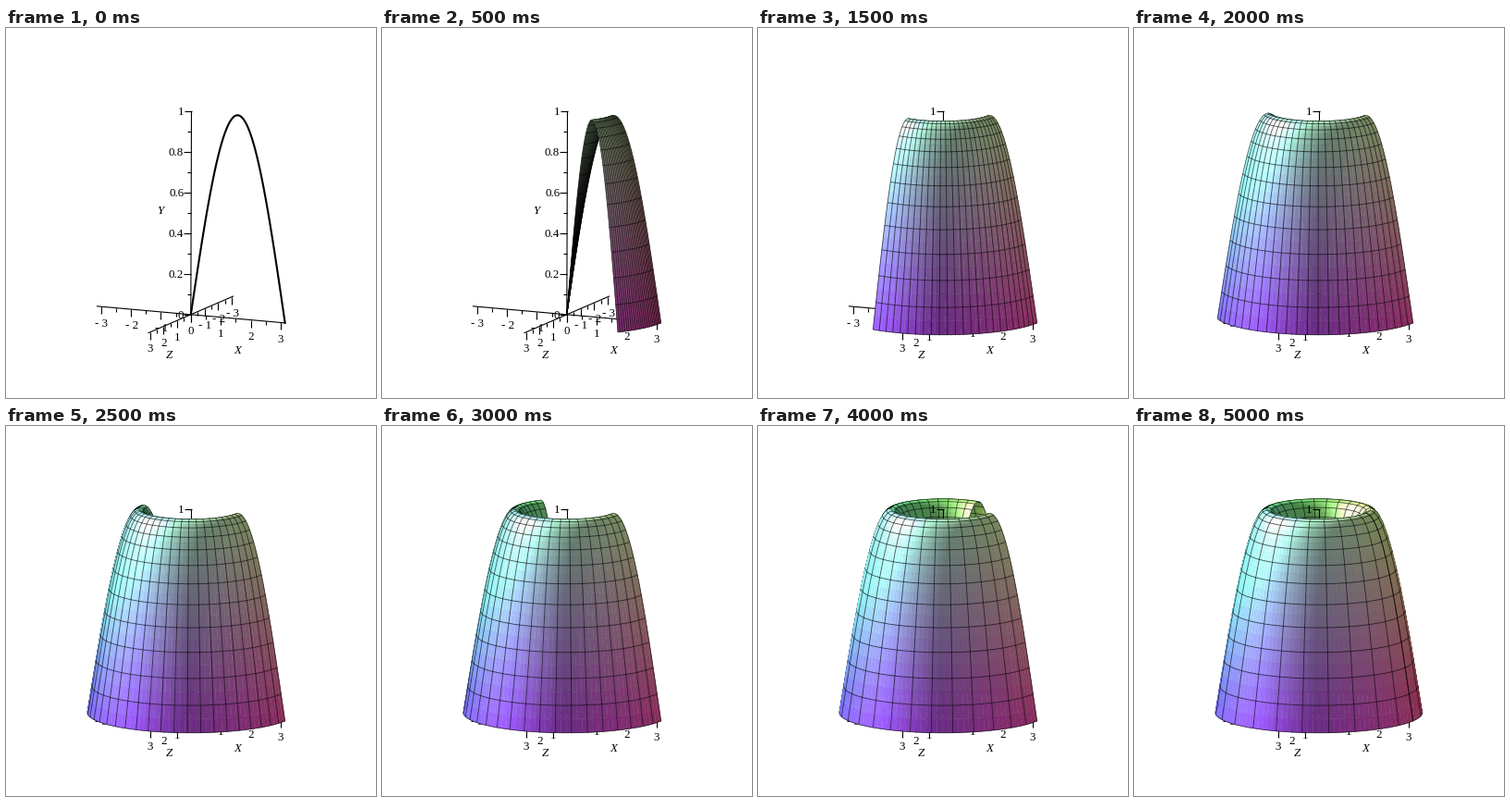
Write a matplotlib script that moves like this. It is 400 px wide and 400 px high and loops after 5.5 s.

```python
import numpy as np
import matplotlib.pyplot as plt
from matplotlib.animation import FuncAnimation
from matplotlib.collections import LineCollection, PolyCollection

SIZE, DPI = 400, 100
FRAMES, INTERVAL = 11, 500
GRID = 24                                   # mesh cells in each direction
PX = 72 / DPI                               # points per pixel
CENTER = np.array([199.8, 309.8])
SCALE, RISE = 35.6, 220.0                   # pixels per ground unit and per unit of Y
AZ, EL = np.radians(65.6), np.radians(11.3)
STRETCH = RISE / np.cos(EL) / SCALE

plt.rcParams["font.family"] = "Liberation Serif"
fig = plt.figure(figsize=(SIZE / DPI, SIZE / DPI), dpi=DPI, facecolor="white")
ax = fig.add_axes([0, 0, 1, 1])


def project(x, y, z):
    across = x * np.sin(AZ) - z * np.cos(AZ)
    near = x * np.cos(AZ) + z * np.sin(AZ)
    return np.stack([CENTER[0] + SCALE * across,
                     CENTER[1] + SCALE * np.sin(EL) * near - RISE * y], -1)


def surface(r, t):
    return project(r * np.cos(t), np.sin(r) + 0 * t, r * np.sin(t))


def direction(az, el):
    return np.array([np.cos(az) * np.cos(el), np.sin(az) * np.cos(el), np.sin(el)])


VIEW = direction(AZ, EL)
LIGHT = direction(np.radians(165), np.radians(35))
HALF = (VIEW + LIGHT) / np.linalg.norm(VIEW + LIGHT)


def shade(r, t):
    """Position-based colour with ambient, diffuse and specular light."""
    x, y, z = r * np.cos(t), np.sin(r) + 0 * t, r * np.sin(t)
    base = 0.3 + 0.7 * np.stack([(x / np.pi + 1) / 2, y, (z / np.pi + 1) / 2], -1)
    slope = -STRETCH * np.cos(r)
    n = np.stack([slope * np.cos(t), slope * np.sin(t), np.ones_like(x)], -1)
    n /= np.linalg.norm(n, axis=-1, keepdims=True)
    n *= np.where(n @ VIEW < 0, -1, 1)[..., None]
    diffuse = np.clip(n @ LIGHT, 0, None)[..., None]
    gloss = np.clip(n @ HALF, 0, None)[..., None] ** 20
    return np.clip(base * (0.53 + diffuse) + 0.35 * gloss * (diffuse > 0), 0, 1)


def draw_sheet(r0, r1, lo, hi, meridians, z):
    r = np.linspace(r0, r1, GRID + 1)
    t = np.linspace(lo, hi, max(2, int(np.degrees(hi - lo) / 3) + 2))
    p = surface(r[:, None], t[None, :])
    quads = np.stack([p[:-1, :-1], p[1:, :-1], p[1:, 1:], p[:-1, 1:]], 2)
    rm, tm = (r[1:] + r[:-1]) / 2, (t[1:] + t[:-1]) / 2
    colors = shade(rm[:, None], tm[None, :]).reshape(-1, 3)
    ax.add_collection(PolyCollection(quads.reshape(-1, 4, 2), facecolors=colors,
                                     edgecolors=colors, linewidths=0.4 * PX, zorder=z))
    lines = [surface(a, t) for a in np.linspace(r0, r1, GRID // 2 + 1)]
    lines += [surface(r, np.full_like(r, m)) for m in meridians]
    ax.add_collection(LineCollection(lines, colors=[(0, 0, 0, 0.62)],
                                     linewidths=0.9 * PX, zorder=z + 0.1))


def draw_surface(angle):
    steps = np.linspace(0, angle, GRID + 1)
    left, right = AZ + np.pi / 2, AZ + 3 * np.pi / 2
    for lo, hi, front in [(left, right, False), (0, left, True), (right, 2 * np.pi, True)]:
        hi = min(hi, angle)
        if hi - lo < 1e-6:
            continue
        inside = steps[(steps >= lo - 1e-9) & (steps <= hi + 1e-9)]
        inner, outer = (6, 7) if front else (2, 1)
        draw_sheet(0, np.pi / 2, lo, hi, inside, inner)
        draw_sheet(np.pi / 2, np.pi, lo, hi, inside, outer)


def label(x, y, s, ha="center", style="normal"):
    ax.text(x, y + 4.4, s, ha=ha, va="baseline", fontsize=13 * PX,
            style=style, color="black", zorder=4)


def draw_axes():
    lines = []

    def tick(p, dx, dy):
        lines.append([p, p + np.array([dx, dy])])

    for unit in (np.array([1, 0, 0]), np.array([0, 0, 1])):
        lines.append([project(*(-np.pi * unit)), project(*(np.pi * unit))])
        for k in range(-6, 7):
            p = project(*(k / 2 * unit))
            if k % 2:
                tick(p, 0, 4)
                continue
            tick(p, 0, 8)
            v = k // 2
            if v or unit[0]:
                label(p[0] + (0.8 if v < 0 else 0), p[1] + 17,
                      f"- {-v}" if v < 0 else str(v))
    top = project(0, 1, 0) + np.array([0.7, 0])
    lines.append([project(0, 0, 0), top])
    for k in range(11):
        p = project(0, k / 10, 0) + np.array([0.07 * k, 0])
        tick(p, -4 if k % 2 else -8, 0)
        if k % 2 == 0:
            label(192.2, p[1] - 0.4, f"{k / 10:g}", ha="right")
    ax.add_collection(LineCollection(lines, colors="black", linewidths=1.1 * PX, zorder=4))
    label(166.5, 197, "Y", style="italic")
    label(250.5, 348, "X", style="italic")
    label(176, 353, "Z", style="italic")


def update(i):
    ax.cla()
    ax.set_xlim(0, SIZE)
    ax.set_ylim(SIZE, 0)
    ax.axis("off")
    draw_axes()
    if i == 0:
        r = np.linspace(0, np.pi, 120)
        ax.plot(*surface(r, 0 * r).T, color="black", lw=2.1 * PX, zorder=8)
    else:
        draw_surface(2 * np.pi * i / (FRAMES - 1))
    return []


anim = FuncAnimation(fig, update, frames=FRAMES, init_func=lambda: [],
                     interval=INTERVAL, repeat=True, repeat_delay=0, blit=False)
plt.show()
```
